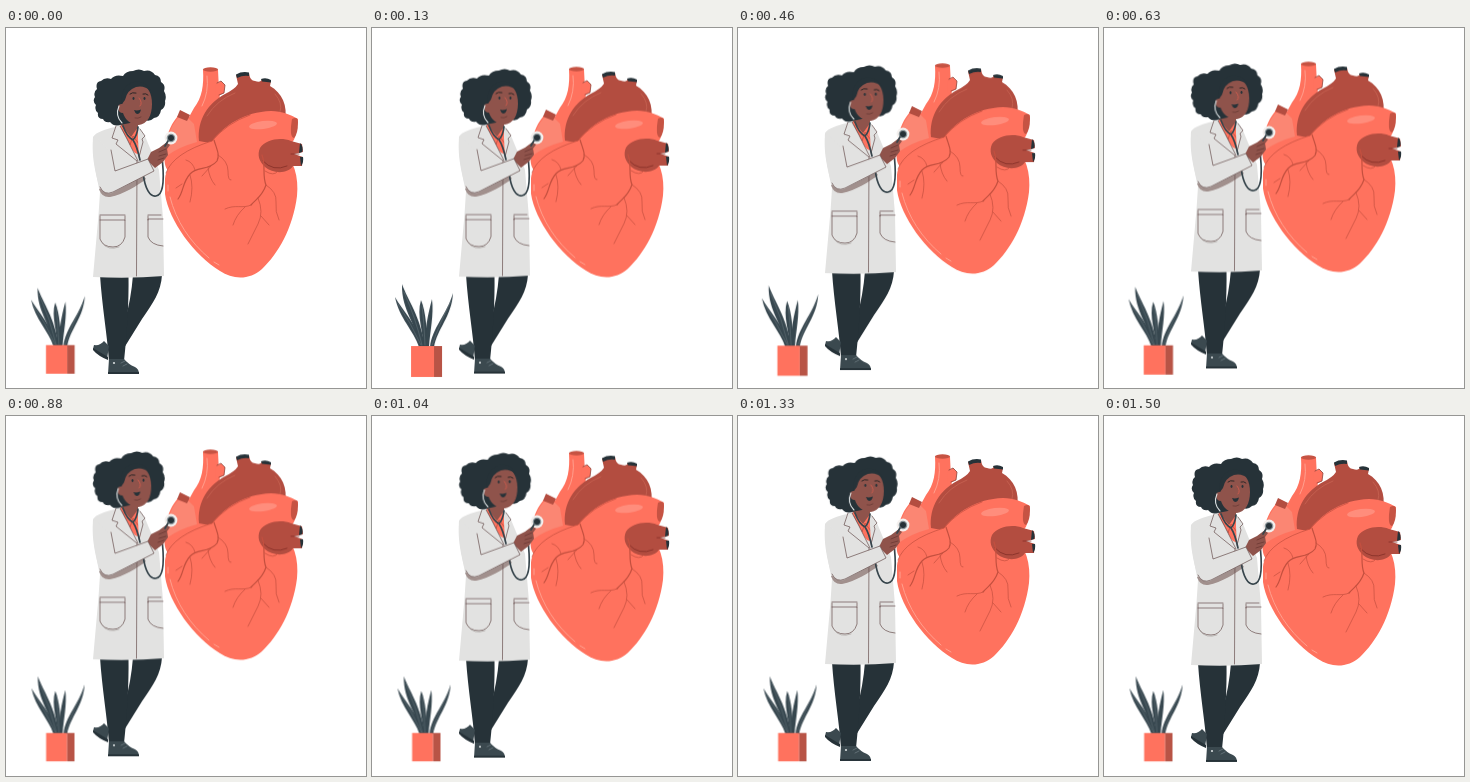
An HTML page for the animation above (1540 ms loop, 360 by 360 pixels).

```html
<!DOCTYPE html>
<html lang="en">
<head>
<meta charset="utf-8">
<title>Cardiology</title>
<style>
  html, body { margin: 0; width: 100%; height: 100%; overflow: hidden; background: #fff; }
  svg { display: block; width: 100vw; height: 100vh; }
  .float { animation: float 1.54s cubic-bezier(.37, 0, .63, 1) infinite; }
  .head { transform-origin: 122px 100px; animation: tilt 1.54s cubic-bezier(.37, 0, .63, 1) infinite; }
  .plant { transform-origin: 52px 306px; animation: beat 1.54s ease-in-out infinite; }
  @keyframes float { 50% { transform: translateY(-6px); } }
  @keyframes tilt { 50% { transform: rotate(-2deg); } }
  @keyframes beat {
    0% { transform: scale(.925); }
    9% { transform: scale(1); }
    21.5%, 23% { transform: scale(.93); }
    35.5% { transform: scale(1); }
    41% { transform: scale(.945); }
    53%, 97% { transform: scale(.915); }
    100% { transform: scale(.925); }
  }
  .dark { fill: #263238; }
  .leaf { fill: #37474f; }
  .red { fill: #ff725e; }
  .deep { fill: #b34d40; }
  .skin { fill: #8f534b; }
  .coat { fill: #e2e2e1; }
  .line { fill: none; stroke-linecap: round; stroke-linejoin: round; }
  .seam { stroke: #67504e; stroke-width: .7; }
  .vein { stroke: #c4503f; stroke-width: .7; }
  .trunk { stroke-width: 1.2; }
  .tube { stroke: #37454c; stroke-width: 1.7; }
  .shine { stroke: #ffa08f; stroke-width: 1; }
</style>
</head>
<body>
<svg viewBox="0 0 360 360">
  <g class="plant">
    <g class="leaf">
      <path d="M47 319C42 303 27 290 23 269C30 282 45 296 51 319Z"/>
      <path d="M48 319C46 298 29 283 30 256C36 273 48 287 53 319Z"/>
      <path d="M51 319C52 304 44 288 49 272C54 284 55 302 55 319Z"/>
      <path d="M54 319C52 304 56 286 60 271C62 287 58 303 57 319Z"/>
      <path d="M58 319C60 300 75 286 81 265C80 288 65 301 62 319Z"/>
    </g>
    <path class="line" stroke="#7d8b90" stroke-width=".4" d="M50 317Q44 291 32 264M49 317Q39 295 26 276M53 317Q52 294 50 278M60 317Q67 297 79 273"/>
    <path class="red" d="M39 318H62V349H39Z"/>
    <path fill="#b85446" d="M62 318H70V349H62Z"/>
  </g>

  <g class="float">
    <!-- heart -->
    <path class="red" d="M197 42C198 57 196 70 188 80L183 89L173 87C166 94 161 105 160 116C157 133 157 149 175 144L207 115L208 88C213 77 215 68 213 62L212 42Z"/>
    <path fill="#fb8673" d="M173 89C166 96 162 106 161 117L162 127Q173 119 191 114L188 96L183 91Z"/>
    <path class="red" d="M209 57L215 53L219 57L218 65L210 69Z"/>
    <path class="line" stroke="#8c4238" stroke-width=".8" d="M211 55L215 53L219 57L218 65L213 67"/>
    <ellipse cx="204.5" cy="41.5" rx="7.6" ry="2.2" fill="#c65343"/>
    <path class="line shine" d="M201 48Q203 64 196 78"/>
    <path class="deep" d="M193 113C191 92 202 75 219 66Q229 61 232 56L230 47L243 45Q244 53 249 53Q255 55 256 51L265 53L264 58C276 65 282 77 279 94L245 105L209 116Z"/>
    <path class="dark" d="M230 46.5Q236 43 243 44.5L243 48Q237 47 231 50ZM255 51Q260 49 265 52L265 54.5L256 53.5Z"/>
    <path class="line" stroke="#cb6655" stroke-width=".7" d="M201 88Q211 72 229 65M269 66Q277 75 274 84"/>
    <path class="red" d="M159 151C161 134 177 121 206 113C219 97 238 84 265 83C276 83 285 87 292 91L289 109C287 116 281 118 275 119C288 132 293 149 291 168C287 200 272 226 256 241C244 252 227 252 214 243C188 227 163 193 159 166Z"/>
    <path fill="#c65343" d="M286 91Q292 88 292 94Q292 106 288 110Q283 109 286 91Z"/>
    <path class="line vein" d="M206 113Q221 95 244 87M160 145Q167 125 206 113"/>
    <ellipse cx="257" cy="97" rx="14" ry="4" fill="#ff8d7c" transform="rotate(-7 257 97)"/>
    <path class="deep" d="M254 120C260 111 275 109 285 113L296 116L297 124L288 126L297 129L296 138L287 138C282 146 267 146 259 139C253 133 251 127 254 120Z"/>
    <path class="dark" d="M294 115Q298 119 296 124L293 125ZM294 129L297 129Q298 134 295 138Z"/>
    <path class="line" stroke="#842f27" stroke-width=".8" d="M257 133Q267 144 281 138M285 126L293 126"/>
    <g class="line vein">
      <path class="trunk" d="M208 112C211 122 214 127 211 133C203 143 191 138 184 146C176 155 178 163 172 171"/>
      <path d="M189 142Q187 134 180 132M184 147Q188 159 184 174M202 139Q203 150 209 157M212 127Q222 133 222 143T225 152M176 156L170 160M205 138L196 148"/>
      <path class="trunk" d="M256 127C260 138 256 147 260 157C256 169 250 171 245 177"/>
      <path d="M245 177C237 181 229 176 219 181M260 157Q271 164 270 174T273 192M259 143Q268 149 272 143M252 170Q258 184 252 196T242 216M239 179Q230 187 227 197M255 188L263 197"/>
    </g>
    <path class="line shine" d="M164 169C170 193 184 214 203 230M208 234L213 237M162 157L162 163"/>
    <path class="deep" d="M174 82L184 87L181 93L171 89Z"/>

    <!-- legs -->
    <path class="dark" d="M127 247H156C155 264 147 275 136 291L118 320L101 318L119 292Q125 272 127 247Z"/>
    <path class="dark" d="M94 247H122.500C123 274 121 306 118 333H103C101 305 96 278 94 247Z"/>
    <path fill="#3b494f" d="M98 313L103 318L101 331Q94 327 87 321L88 317Q94 318 98 313Z"/>
    <path fill="#3b494f" d="M103 331L118 331Q122 336 129 339Q133 341 133 346H102Z"/>
    <path class="dark" d="M102 344H133V346H102ZM87 320L102 329V332Q92 328 87 322Z"/>
    <circle cx="108" cy="335" r="1.1" fill="#d7dcdd"/>
    <path class="line" stroke="#87949a" stroke-width=".5" d="M115 335L119 333M117 338L121 336"/>

    <!-- coat -->
    <path class="coat" d="M109 99C100 101 90 104 87 109C86 122 90 148 94 164L92.500 187L87 249Q123 251 158 248L157 190L153 142L139 108Q134 101 127 98Z"/>
    <path fill="#a1908d" d="M93 161Q96 170 104 169C118 166 131 158 140 151L137 147Z"/>
    <path class="skin" d="M117 91H132L132 104L126 115L114 99Z"/>
    <path class="red" d="M115 97L125 109L132 99L136 105L134 127L129 125L114 107Z"/>
    <path class="line" stroke="#b74c3f" stroke-width=".7" d="M116 101L124 117L127 108L133 116"/>
    <path class="coat" d="M110 98L106 110L112 112L110 116L132 133L121 111L114 98Z"/>
    <path class="coat" d="M132 98L139 108L136 111L137 114L133 129L132 111Z"/>
    <path class="line seam" d="M114 98L121 111L132 133M110 98L106 110L112 112L110 116L131 133M134 101L139 108L136 111L137 114L133 129M131 133L130.500 248M94 187H119M142 187H155"/>
    <g class="line seam">
      <path d="M94 192H119V209Q116 219 107 219Q97 219 94 211V188M157 191H142V209Q145 217 157 218M142 188V192M119 188V192"/>
      <path stroke="#a8a3a0" d="M96 215Q102 223 113 219"/>
    </g>

    <!-- stethoscope and arm -->
    <path class="line tube" d="M117 98Q121 109 127 112Q131 118 134 132M132 99Q131 108 127 112M137 145C139 161 144 169 150 168C158 167 158 150 156.500 134"/>
    <path class="skin" d="M141 132L145 124L153 120L161 114L164 117L161 121L162 127L157 134L149 140Z"/>
    <path class="line" stroke="#61302c" stroke-width=".6" d="M153 124L160 121M153 128L160 126M152 132L158 130"/>
    <path class="coat" d="M88 108C84 123 90 149 94 160Q98 167 106 165L148 143L142 131L110 143L106 125Z"/>
    <path class="line seam" d="M105 122L109 143L142 131L148 143L107 164Q98 168 94 159"/>
    <circle cx="165" cy="110" r="6.4" fill="#f4f0ee"/>
    <circle cx="165" cy="110" r="4.300" fill="#89959a"/>
    <circle cx="165" cy="110" r="3" class="dark"/>
    <path class="line tube" d="M162 113L159 118"/>

    <!-- head -->
    <g class="head">
      <path class="dark" d="M114 97Q108 99 104 94Q99 95 97 91Q91 91 92 85Q88 82 90 77Q86 73 89 69Q87 64 91 61Q89 54 95 53Q99 49 105 51Q109 46 117 48Q120 43 127 43Q133 40 138 43Q145 41 149 47Q155 48 155 54Q160 57 158 63Q161 68 159 73Q160 79 155 82Q154 89 148 90Q144 94 139 92Z"/>
      <path class="skin" d="M117 74C117 63 123 56 134 56C142 57 146 66 146 76C146 88 141 96 133 97C124 97 119 91 117 85C111 85 110 75 116 76Z"/>
      <path class="dark" d="M116 76C114 65 119 56 128 54Q140 52 145 63Q138 57 130 59Q121 62 119 72Z"/>
      <path class="line" stroke="#2b2626" stroke-width="1" d="M124 66Q126 64 130 65M137 66Q140 65 142 67"/>
      <ellipse cx="127.500" cy="70.500" rx="1" ry="1.400" class="dark"/>
      <ellipse cx="138.500" cy="70.500" rx="1" ry="1.400" class="dark"/>
      <path class="line" stroke="#d65c4f" stroke-width=".8" d="M133 70Q137 75 134 78"/>
      <path class="dark" d="M128 82Q131 83 135 81.500Q134 86 131 86Q129 85 128 82Z"/>
      <path class="line" stroke="#5b332f" stroke-width=".6" d="M129 90Q132 91 135 89"/>
      <path class="line" stroke="#dde2e3" stroke-width="1.1" d="M113 78C110 85 112 91 116 95"/>
    </g>
  </g>
</svg>
</body>
</html>
```
